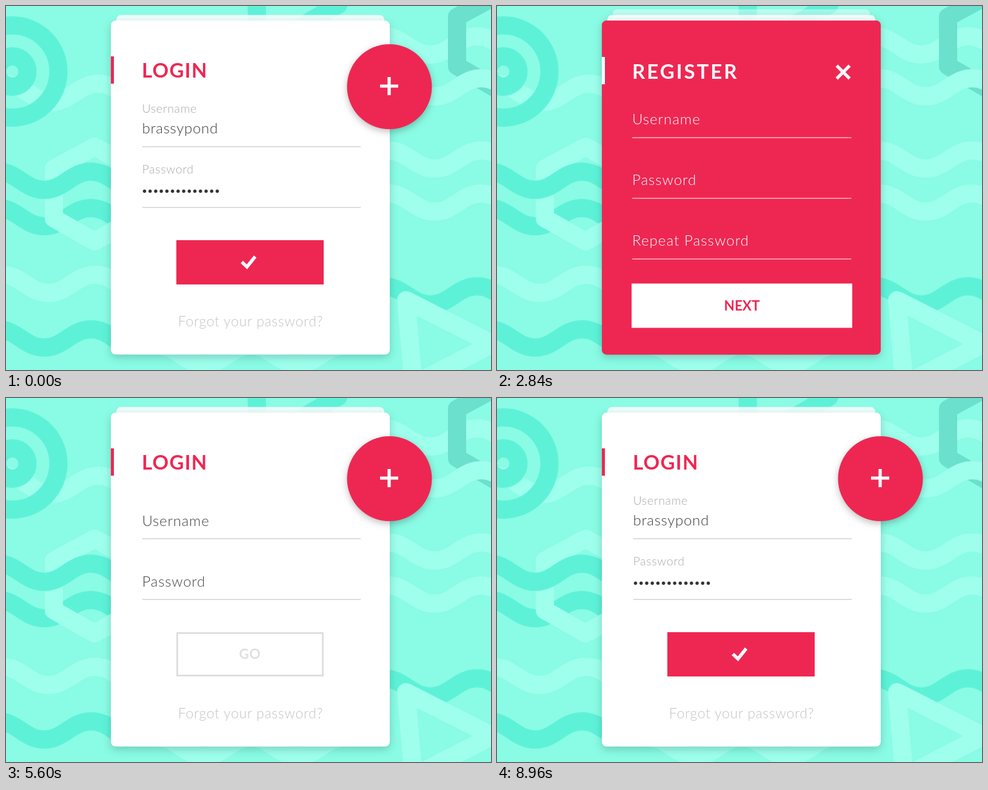
These frames come from a looping animation (800 by 600 pixels, 9 s). An HTML page:

```html
<!DOCTYPE html>
<html lang="en">
<head>
<meta charset="utf-8">
<title>Login and register</title>
<style>
  html, body { margin: 0; width: 100%; height: 100%; overflow: hidden; background: #8afbe4; }
  svg { display: block; width: 100vw; height: 100vh; }
  text { font-family: Lato, "Open Sans", sans-serif; font-weight: 300; font-size: 24px; letter-spacing: .8px; white-space: pre; }
  .title { font-weight: 700; font-size: 33px; }
  .bold { font-weight: 700; font-size: 22.5px; text-anchor: middle; }
  .card { filter: drop-shadow(0 5px 7px rgba(0, 50, 45, .22)); }
  .disc { filter: drop-shadow(0 4px 6px rgba(0, 0, 0, .25)); }
  #bg path, #bg circle { fill: none; stroke-width: 30; stroke-linecap: round; stroke-linejoin: round; }
</style>
</head>
<body>
<svg viewBox="0 0 800 600" preserveAspectRatio="none">
  <defs>
    <clipPath id="frame"><rect x="173" y="24" width="460" height="550.5" rx="8"/></clipPath>
    <clipPath id="hole"><circle id="holeDisc"/></clipPath>
  </defs>
  <g id="bg"></g>

  <rect id="back" x="173" y="24" width="460" height="550.5" rx="8" fill="#fff"/>

  <g id="login">
    <rect id="sheet" class="card" x="173" y="24" width="460" height="550.5" rx="8" fill="#fff"/>
    <rect x="173" y="83" width="5" height="45" fill="#ee2752"/>
    <text class="title" x="224" y="118" fill="#ee2752" style="letter-spacing:1.3px">LOGIN</text>
    <path d="M225 232H585M225 332H585" stroke="#dcdcde" stroke-width="2"/>
    <text id="userLabel">Username</text>
    <text id="userValue" x="224.500" y="210" fill="#3c3c3c" style="letter-spacing:.7px"></text>
    <text id="passLabel">Password</text>
    <g id="dots" fill="#333"></g>
    <rect id="button" x="282.500" y="387.500" width="240" height="70" fill="#fff" stroke-width="3"/>
    <text id="go" class="bold" x="402.500" y="430.500">GO</text>
    <g id="done">
      <rect x="281" y="386" width="243" height="73" fill="#ee2752"/>
      <path id="tick" d="M389 422L397.500 430L411 413" fill="none" stroke="#fff" stroke-width="5.500" pathLength="1" stroke-dasharray="1 2"/>
    </g>
    <text x="403.500" y="528" fill="#c3c3c6" text-anchor="middle" style="font-size:23px;letter-spacing:.7px">Forgot your password?</text>
  </g>

  <rect id="panel" class="card" x="173" y="24" width="460" height="550.5" rx="8" fill="#ee2752"/>
  <g id="window"><circle id="disc" class="disc" fill="#ee2752"/></g>
  <g clip-path="url(#frame)"><g id="register" clip-path="url(#hole)" fill="#fff">
    <rect id="bar" x="173" y="84" width="5" height="45"/>
    <g class="row">
      <text class="title" x="223" y="120" style="letter-spacing:3px">REGISTER</text>
      <text x="223" y="195" style="letter-spacing:1px">Username</text>
      <rect x="223" y="216" width="361.500" height="2" opacity=".5"/>
    </g>
    <g class="row">
      <text x="223" y="295" style="letter-spacing:1px">Password</text>
      <rect x="223" y="316" width="361.500" height="2" opacity=".5"/>
    </g>
    <g class="row">
      <text x="223" y="395" style="letter-spacing:1.100px">Repeat Password</text>
      <rect x="223" y="416" width="361.500" height="2" opacity=".5"/>
    </g>
    <g class="row">
      <rect x="222" y="457.500" width="364" height="73"/>
      <text class="bold" x="404" y="502" fill="#ee2752" style="letter-spacing:0">NEXT</text>
    </g>
  </g></g>
  <path id="plus" d="M-15 0H15M0 -15V15" stroke="#fff" stroke-width="5.200"/>
</svg>

<script>
const LOOP = 9000, OPEN = 1800, CLOSE = 4480, MOVE = 880;
const USER = 'brassypond', DOTS = 14;

const $ = id => document.getElementById(id);
const set = (el, attrs) => { for (const k in attrs) el.setAttribute(k, attrs[k]); };
const add = (parent, tag, attrs) => {
  const el = document.createElementNS('http://www.w3.org/2000/svg', tag);
  set(el, attrs);
  return parent.appendChild(el);
};

const clamp = v => Math.min(1, Math.max(0, v));
const mix = (a, b, p) => a + (b - a) * p;
const easeOut = (p, n) => 1 - (1 - p) ** n;
const easeInOut = (p, n) => p < .5 ? (2 * p) ** n / 2 : 1 - (2 - 2 * p) ** n / 2;
const sineInOut = p => (1 - Math.cos(Math.PI * p)) / 2;
const sineOut = p => Math.sin(p * Math.PI / 2);
const blend = (a, b, p) => `rgb(${a.map((v, i) => Math.round(mix(v, b[i], p)))})`;
const bezier = (a, b, c, d, p) => {
  const q = 1 - p;
  return [0, 1].map(i => q * q * q * a[i] + 3 * q * q * p * b[i] + 3 * q * p * p * c[i] + p * p * p * d[i]);
};

// Backdrop
const DARK = '#5df2d8', LIGHT = '#9effed', SHADE = '#6be0cd';
const line = (d, stroke) => add($('bg'), 'path', { d, stroke });
// Starts on a crest and swings down and up again, one half period per step.
const wave = (x, y, steps, stroke, tail = '') => {
  let d = `M${x} ${y}`;
  for (let i = 0; i < steps; i++) d += i % 2 ? 'c32 0 45 -30 77 -30' : 'c32 0 45 30 77 30';
  line(d + tail, stroke);
};
const ring = r => add($('bg'), 'circle', { cx: 10.5, cy: 108, r, stroke: DARK });

wave(-2, 128, 3, LIGHT);
ring(76);
ring(25);
wave(-14, 333, 3, DARK);
line('M146 232L79 268V350L146 388L213 350V268Z', LIGHT);
wave(-14, 273, 3, DARK);
wave(-7, 443, 3, LIGHT);
wave(-14, 533, 2, DARK, 'c25 0 35 15 58 27');
wave(250, 560, 4, LIGHT);
line('M412 -80L548 -2L415 75Z', DARK);
wave(623, 50, 3, LIGHT);
line('M820 -23L744 18V99L820 143', SHADE);
for (const y of [119, 238, 309]) wave(630, y, 3, LIGHT);
wave(623, 462, 3, DARK);
line('M660 485L802 557L672 624Z', LIGHT);

const dots = Array.from({ length: DOTS }, (_, i) =>
  add($('dots'), 'circle', { cx: 228.5 + i * 9.23, cy: 305.3, r: 2.7 }));
const rows = [...document.querySelectorAll('.row')];

// Depth 0 is the front card; each level behind is smaller, higher and fainter.
const depth = (el, fillEl, k) => {
  el.setAttribute('transform',
    `translate(403 ${299 - 20 * k}) scale(${1 - .039 * k}) translate(-403 -299)`);
  fillEl.setAttribute('fill-opacity', k < 1 ? mix(1, .85, k) : mix(.85, .42, k - 1));
};

// Label shrinks, then rises; ms counts from focus.
const label = (el, y, ms) => {
  const p = easeInOut(clamp(ms / 240), 2);
  const rise = 35.5 * easeInOut(clamp((ms - 100) / 340), 2);
  set(el, {
    transform: `translate(224.5 ${y - rise}) scale(${mix(1, .815, p)})`,
    fill: blend([68, 68, 72], [168, 168, 170], p)
  });
};
const typed = (ms, count, end) => Math.round(count * clamp((ms - 280) / (end - 280)));

function drawForm(t) {
  const since = start => t < 1440 ? 2000 : Math.max(0, t - start);
  const user = since(5880), pass = since(6880), active = clamp((since(7440)) / 200);
  const sent = since(8200);

  label($('userLabel'), 211.5, user);
  $('userValue').textContent = USER.slice(0, typed(user, USER.length, 700));
  label($('passLabel'), 311.5, pass);
  const shown = typed(pass, DOTS, 720);
  dots.forEach((dot, i) => dot.setAttribute('opacity', i < shown ? 1 : 0));

  const tone = blend([223, 223, 226], [238, 39, 82], active);
  $('button').setAttribute('stroke', tone);
  $('go').setAttribute('fill', tone);
  $('done').setAttribute('opacity', sineInOut(clamp(sent / 320)));
  const tick = easeOut(clamp((sent - 320) / 420), 2);
  set($('tick'), { 'stroke-dashoffset': 1 - tick, opacity: tick > 0 ? 1 : 0 });
}

function drawCards(t) {
  const closing = t >= CLOSE;
  const ms = closing ? t - CLOSE : Math.max(0, t - OPEN);
  const p = clamp(ms / MOVE);
  let path, grow, front, rear, turn, pos, clipped;

  if (closing) {
    path = 1 - easeOut(p, 3);
    grow = (1 - p) ** 3.9;
    front = (1 - clamp(ms / 1160)) ** 3;
    rear = (1 - clamp((ms - 240) / 920)) ** 3;
    turn = 135 * front;
    pos = bezier([571, 109], [541, 200], [658, 195], [632, 132], easeOut(p, 2.28));
    clipped = ms < 340;
  } else {
    path = clamp(ms / 640);
    grow = p ** 1.91;
    front = sineOut(p);
    rear = easeOut(p, 2);
    turn = 135 * easeInOut(p, 3);
    pos = bezier([632, 132], [571.7, 218.3], [551.3, 210.7], [571, 109], easeOut(p, 1.53));
    clipped = ms >= 320;
  }

  depth($('back'), $('back'), 1 + rear);
  depth($('login'), $('sheet'), front);

  const disc = {
    cx: mix(632.5, 403, sineInOut(path)),
    cy: mix(133, 299, sineOut(path)),
    r: mix(70, 390, grow)
  };
  set($('disc'), disc);
  set($('holeDisc'), disc);
  if (clipped) $('window').setAttribute('clip-path', 'url(#frame)');
  else $('window').removeAttribute('clip-path');
  $('panel').setAttribute('opacity', clamp((disc.r - 325) / 45));

  const leave = 1 - clamp(ms / 240);
  rows.forEach((row, i) => {
    const q = closing ? 1 : clamp((ms - 107 - 110 * i) / 620);
    set(row, {
      transform: `translate(${60 * (1 - q) ** 3} 0)`,
      opacity: closing ? leave : clamp(q * 3)
    });
  });
  $('bar').setAttribute('opacity', closing ? leave : 1);
  $('plus').setAttribute('transform', `translate(${pos}) rotate(${turn})`);
}

const began = performance.now();
function frame() {
  const t = (performance.now() - began) % LOOP;
  drawForm(t);
  drawCards(t);
  requestAnimationFrame(frame);
}
frame();
</script>
</body>
</html>
```
